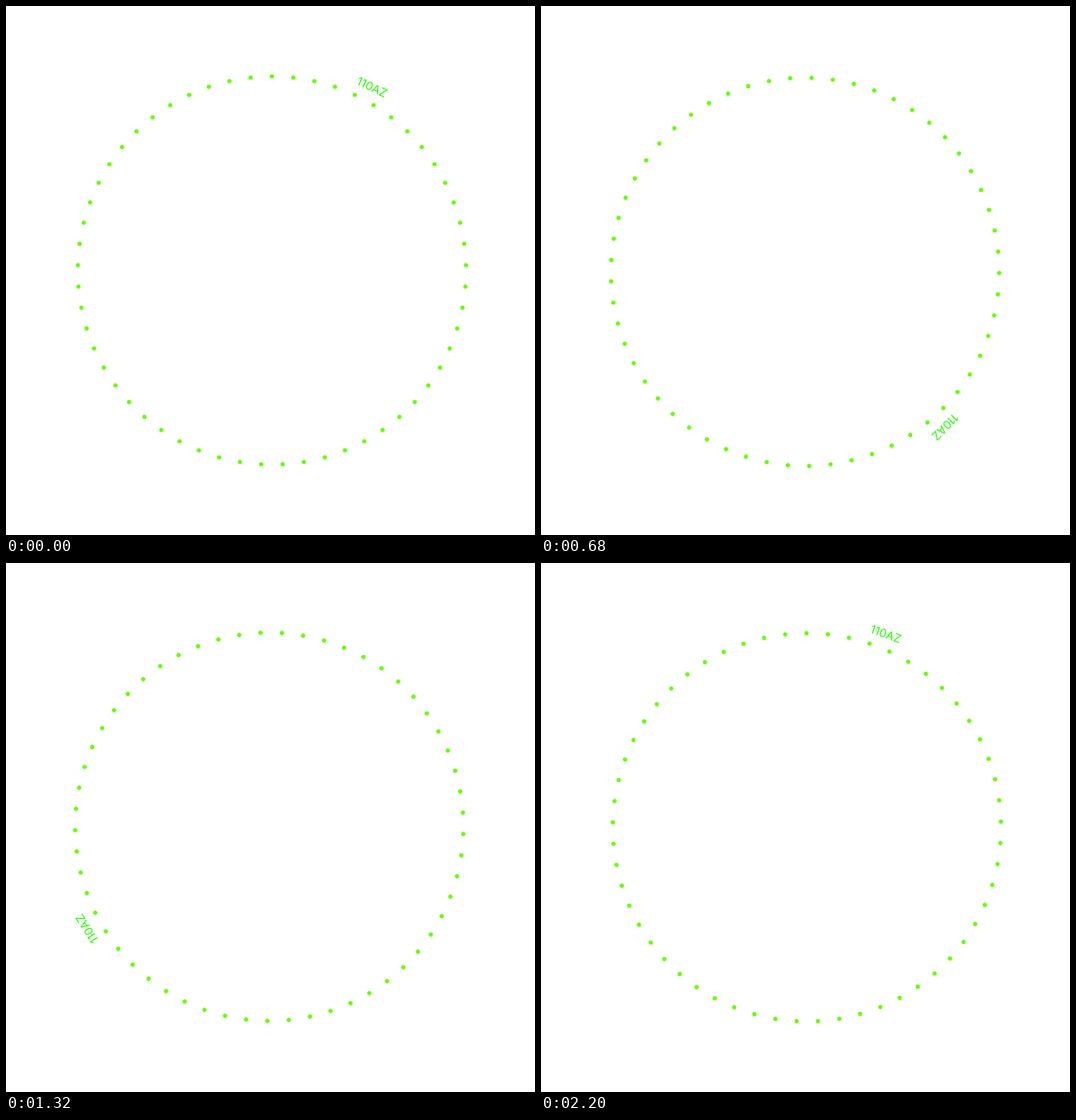
These frames come from a looping animation (748x748 px, 2.24 s). An HTML page with a canvas:

```html
<!DOCTYPE html>
<html lang="en">
<head>
<meta charset="utf-8">
<title>Dot dial</title>
<style>
  html, body { margin: 0; width: 100%; height: 100%; overflow: hidden; background: #fff; }
  canvas { display: block; }
</style>
</head>
<body>
<canvas id="stage" width="748" height="748"></canvas>
<script>
const ctx = document.getElementById('stage').getContext('2d');
const MID = 374, LOOP = 2240, STEP = 40, TAU = Math.PI * 2;
const ring = { count: 57, radius: 274.5, shift: 2, dot: 3, color: '#66ff00' };
const label = { text: '110AZ', font: '400 16.4px Inter, sans-serif', x: 16.6, y: -290, turn: TAU / 14, color: '#22ff00' };

function drawRing() {
  ctx.fillStyle = ring.color;
  for (let i = 0; i < ring.count; i++) {
    const a = i / ring.count * TAU;
    ctx.beginPath();
    ctx.arc(ring.shift + ring.radius * Math.sin(a), -ring.radius * Math.cos(a), ring.dot, 0, TAU);
    ctx.fill();
  }
}

// Centres the visible ink of the label on label.x.
function drawLabel() {
  ctx.rotate(label.turn);
  ctx.font = label.font;
  ctx.fillStyle = label.color;
  const m = ctx.measureText(label.text);
  const inkMid = (m.actualBoundingBoxRight - m.actualBoundingBoxLeft) / 2;
  ctx.fillText(label.text, label.x - inkMid, label.y);
}

function draw() {
  // The turn is stepped: one step is nearly one dot gap, so the dots seem to creep.
  const t = Math.floor(performance.now() % LOOP / STEP) * STEP;
  ctx.setTransform(1, 0, 0, 1, 0, 0);
  ctx.fillStyle = '#fff';
  ctx.fillRect(0, 0, 748, 748);
  ctx.translate(MID, MID);
  ctx.rotate(t / LOOP * TAU);
  drawRing();
  drawLabel();
  requestAnimationFrame(draw);
}
draw();
</script>
</body>
</html>
```
